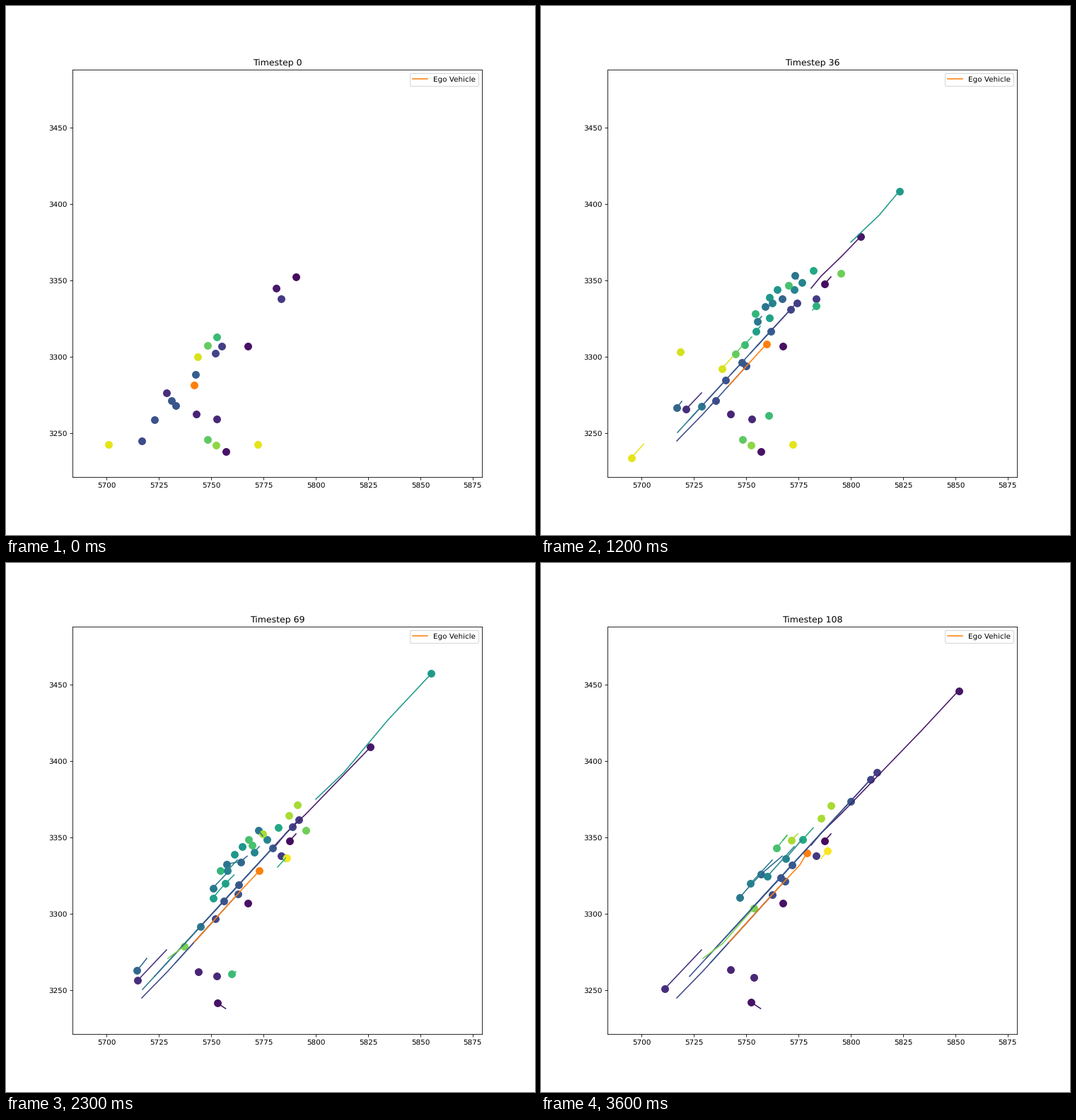
Write a matplotlib script that moves like this. It is 748 px wide and 748 px high and loops after 3700 ms.

```python
import numpy as np
import matplotlib.pyplot as plt
from matplotlib.animation import FuncAnimation

FRAMES, STEP = 37, 3     # animation frames, timesteps per frame
LAST = FRAMES - 1
XLIM, YLIM = (5683.5, 5879.5), (3221.2, 3488.2)
DOT = 90
ORANGE = "#ff7f0e"
BRAKE_TIME = 12          # decay time of the speed after braking, in frames

# road lanes in stage pixels, from left to right
LEFT_LANE = (193, 603), (478, 293)
RIGHT_LANE = (192, 615), (229, 577), (336, 459), (366, 427), (377, 408)
FAST_LANE = (382, 399), (396, 382), (425, 354), (538, 237), (590, 181)
EXIT_LANE = (438, 334), (478, 296), (540, 222), (644, 111)
BACK_LANE = (174, 603), (227, 547)

plt.rcParams["text.hinting"] = "none"
fig, ax = plt.subplots(figsize=(10, 10), dpi=74.8)
viridis = plt.get_cmap("viridis")
tracks = []


def to_map(x, y):
    """Stage pixels to map coordinates."""
    return (np.interp(x, (93.5, 673.2), XLIM),
            YLIM[1] - (y - 89.8) / 575.9 * (YLIM[1] - YLIM[0]))


def add(shade, life, place):
    color = ORANGE if shade is None else viridis(shade)
    tracks.append((color, life, place))


def cruise(shade, lane, x0, speed, brake=LAST, life=(0, LAST)):
    """Follow a lane at constant speed, slowing down after the brake age."""
    def place(t):
        age = t - life[0]
        late = np.maximum(age - brake, 0)
        run = np.minimum(age, brake) + BRAKE_TIME * (1 - np.exp(-late / BRAKE_TIME))
        x = x0 + speed * run
        return x, np.interp(x, *np.transpose(lane))
    add(shade, life, place)


def drift(shade, life, move, *pts):
    """Stand still except during move, when pts are passed evenly."""
    xs, ys = np.transpose(pts)
    when = np.linspace(*move, len(pts))
    add(shade, life, lambda t: (np.interp(t, when, xs), np.interp(t, when, ys)))


def park(shade, x, y, life=(0, LAST)):
    drift(shade, life, life, (x, y))


# parked cars
park(.04, 342, 480.5)
park(.17, 388.5, 414)
park(.75, 285, 613, (0, 20))
park(.83, 297, 621, (0, 20))
park(.96, 355.5, 619.5, (0, 12))
park(.93, 197, 488.5, (3, 20))
park(.52, 334, 401.5, (11, 34))
park(.53, 323, 412, (11, 30))
park(.66, 303, 435, (11, 34))
park(.78, 424, 378.5, (11, 30))

# traffic going up the road
cruise(.06, FAST_LANE, 382, 5.8)
cruise(.54, EXIT_LANE, 438, 8.6, life=(4, 28))
for shade, x0 in (.18, 305), (.20, 296), (.29, 268):
    cruise(shade, LEFT_LANE, x0, 4.72)
cruise(.25, LEFT_LANE, 210, 4.25, brake=22)
cruise(.27, LEFT_LANE, 234, 4.2, brake=20)
cruise(.41, LEFT_LANE, 193, 4.3, brake=24, life=(4, 34))
cruise(.22, RIGHT_LANE, 192, 4.55, brake=21)
cruise(.26, RIGHT_LANE, 240, 4.2, brake=15)
drift(.80, (18, LAST), (18, LAST), (229, 559), (257, 538), (283, 508), (301, 488))
drift(.64, (3, 30), (3, 30), (384, 430), (400, 412))
drift(.99, (21, LAST), (21, LAST), (396, 418), (405, 407))

# traffic going down the road
cruise(.13, BACK_LANE, 227, -1.8, brake=20)
drift(.33, (3, 35), (3, 35), (199, 559), (192.5, 567.5), (189, 571.5),
      (181, 581), (164, 600))
drift(.33, (3, LAST), (17, LAST), (341, 414.5), (311, 440))
drift(.39, (4, 34), (6, 15), (363, 386), (356.5, 378))
drift(.39, (4, 34), (6, 16), (326, 423), (311.5, 426))
drift(.40, (4, LAST), (7, LAST), (312, 439), (294, 458), (281, 473))
drift(.44, (12, LAST), (12, LAST), (327, 420), (296, 453.5))
drift(.45, (11, LAST), (23, LAST), (369, 391), (346, 418))
drift(.46, (11, LAST), (20, LAST), (358, 401), (320, 443))
drift(.56, (4, 25), (6, 25), (310, 453), (290.5, 476))
drift(.57, (4, 30), (14, 30), (322.5, 441), (301, 463))
drift(.60, (11, LAST), (26, LAST), (385, 374.5), (370, 391))
drift(.68, (0, 20), (0, 20), (298, 468), (281, 486))
drift(.76, (0, 20), (0, 20), (285, 480), (267.5, 500))
drift(.94, (0, 12), (0, 12), (271, 496), (256, 512.5))
drift(.96, (0, 14), (3, 14), (145, 619.5), (124, 643))

# small moves in the parking areas
drift(.03, (0, LAST), (0, 6), (410, 383), (401, 393))
drift(.05, (0, LAST), (17, 24), (310.5, 630), (297, 621))
drift(.10, (0, LAST), (0, LAST), (269, 577), (268, 576.5), (272, 578.5), (268, 575))
drift(.11, (0, LAST), (24, 27), (298, 584), (300.5, 585.5))
drift(.68, (4, 25), (4, 23), (325, 578), (319, 580.5))
drift(.71, (11, 30), (14, 27), (350, 395.5), (347, 400))
drift(.71, (19, LAST), (22, LAST), (342, 392), (348, 385), (333, 403))
drift(.87, (19, LAST), (27, LAST), (411.5, 342), (410, 343.5))
drift(.87, (19, LAST), (27, LAST), (400, 357), (396, 361))
drift(.87, (19, LAST), (27, LAST), (363, 383), (354, 392))

# ego vehicle, last so that it lies on top
cruise(None, RIGHT_LANE, 266, 4.42, brake=15)


def update(frame):
    ax.clear()
    for color, (start, end), place in tracks:
        if not start <= frame <= end:
            continue
        t = np.arange(start * STEP, frame * STEP + 1) / STEP
        x, y = to_map(*place(t))
        ax.plot(x, y, color=color, label="Ego Vehicle" if color == ORANGE else None)
        ax.scatter(x[-1:], y[-1:], s=DOT, color=[color])
    ax.set_xlim(XLIM)
    ax.set_ylim(YLIM)
    ax.set_title(f"Timestep {frame * STEP}")
    # "best" moves the legend aside when a vehicle drives under it
    ax.legend(loc="best")
    return []


anim = FuncAnimation(fig, update, frames=FRAMES, interval=100,
                     init_func=lambda: [], repeat=True, repeat_delay=0)
plt.show()
```
